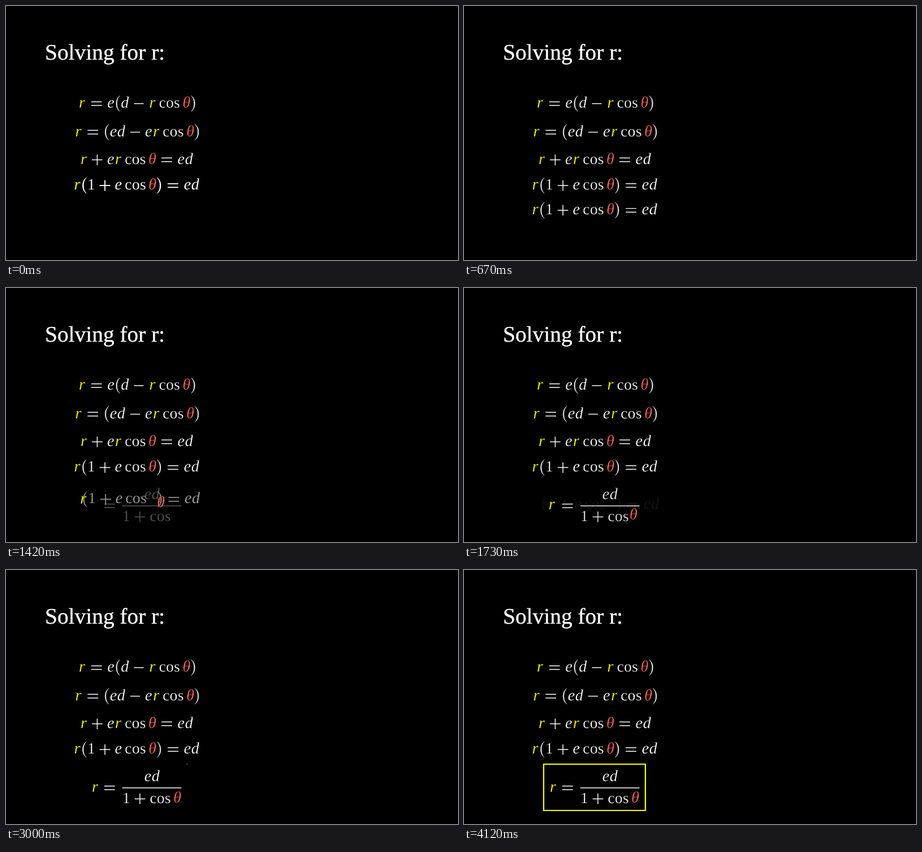
Recreate the animation shown at these times as an HTML page. Size 800 px wide and 450 px high, loop 5 s.

```html
<!DOCTYPE html>
<html lang="en">
<head>
<meta charset="utf-8">
<title>Solving for r</title>
<style>
  html, body { margin: 0; width: 100%; height: 100%; overflow: hidden; background: #000; }
  svg { display: block; width: 100vw; height: 100vh; }
  text { font-family: "Liberation Serif", "Times New Roman", serif; text-rendering: geometricPrecision; }
</style>
</head>
<body>
<svg id="stage" viewBox="0 0 800 450">
  <rect width="800" height="450" fill="#000"/>
  <text x="69" y="95.4" font-size="39.4" fill="#fff" stroke="#fff" stroke-width=".4">Solving for r:</text>
</svg>
<script>
const stage = document.getElementById("stage");
const LOOP = 5000;
const EM = 28.2;
const YELLOW = "#ffff00", RED = "#fc6255", WHITE = "#fff";

// Advance widths in em; " ", ":" and "," are thick, medium and thin spaces.
const ADVANCE = {
  r: .479, e: .466, d: .52, "θ": .469, c: .444, o: .5, s: .394, 1: .5,
  "(": .389, ")": .389, "=": .778, "+": .778, "-": .778,
  " ": .278, ":": .222, ",": .167
};
// Operators and brackets, in thousandths of an em.
const SHAPES = {
  "=": "M56-367H722M56-133H722",
  "+": "M56-250H722M389-583V83",
  "-": "M84-250H694",
  "(": "M326-750Q94-570 94-250T326 250L333 241Q154 70 154-250T333-741Z",
  ")": "M63-750Q295-570 295-250T63 250L56 241Q235 70 235-250T56-741Z"
};

function add(parent, tag, attrs) {
  const el = document.createElementNS("http://www.w3.org/2000/svg", tag);
  for (const key in attrs) el.setAttribute(key, attrs[key]);
  parent.appendChild(el);
  return el;
}

function glyph(parent, ch, x, y) {
  const path = SHAPES[ch];
  if (path) {
    const bracket = ch === "(" || ch === ")";
    return add(parent, "path", {
      d: path,
      transform: `translate(${x} ${y}) scale(${EM / 1000})`,
      fill: bracket ? WHITE : "none",
      stroke: WHITE,
      "stroke-width": bracket ? 10 : 52
    });
  }
  const italic = "redθ".includes(ch);
  // A hairline in the background colour lightens the strokes.
  const el = add(parent, "text", {
    x: x + ADVANCE[ch] * EM / 2,
    y,
    "text-anchor": "middle",
    "font-size": italic ? 28.4 : 27.4,
    "font-style": italic ? "italic" : "normal",
    fill: ch === "r" ? YELLOW : ch === "θ" ? RED : WHITE,
    stroke: "#000",
    "stroke-width": .25
  });
  el.textContent = ch;
  return el;
}

// Sets a formula and returns the x of each character; those in skip leave a gap.
function typeset(parent, formula, x, y, skip = "") {
  const at = {};
  for (const ch of formula) {
    at[ch] = x;
    if (!" :,".includes(ch) && !skip.includes(ch)) glyph(parent, ch, x, y);
    x += ADVANCE[ch] * EM;
  }
  return at;
}

const FACTORED = "r(1:+:e,cos,θ) = ed";
const ROW_X = 119.3, ROW_Y = 325.1, DROP = 50.5;
const SOLVED_X = 150.9, SOLVED_Y = 393.1, LOWER_Y = 412.5;

typeset(stage, "r = e(d:-:r,cos,θ)", 127.9, 180);
typeset(stage, "r = (ed:-:er,cos,θ)", 121.4, 230.6);
typeset(stage, "r:+:er,cos,θ = ed", 130.7, 279.6);
typeset(stage, FACTORED, ROW_X, ROW_Y);

const lowY = ROW_Y + DROP;
const oldPart = add(stage, "g", {});
const from = typeset(oldPart, FACTORED, ROW_X, lowY, "rθ");

const newPart = add(stage, "g", {});
typeset(newPart, "r =", SOLVED_X, SOLVED_Y, "r");
typeset(newPart, "ed", 244.4, 374.4);
const to = typeset(newPart, "1:+:cos,θ", 205.7, LOWER_Y, "θ");
add(newPart, "path", { d: "M205.7 386H310.6", stroke: WHITE, "stroke-width": 1.3 });

const radius = glyph(stage, "r", from.r, lowY);
const angle = glyph(stage, "θ", from["θ"], lowY);

const corners = [[321, 344], [141, 344], [141, 426], [321, 426], [321, 344]];
const frame = add(stage, "path", { fill: "none", stroke: YELLOW, "stroke-width": 2.2 });

const clamp = v => Math.min(1, Math.max(0, v));
const sigmoid = v => 1 / (1 + Math.exp(-v));
function smooth(t) {
  const edge = sigmoid(-5);
  return clamp((sigmoid(10 * (clamp(t) - .5)) - edge) / (1 - 2 * edge));
}

function move(el, x, y) {
  el.setAttribute("transform", `translate(${x} ${y})`);
}

// Every side takes an equal share of the drawing time.
function outline(share) {
  if (share <= 0) return "";
  if (share >= 1) return "M" + corners.slice(0, 4).join("L") + "Z";
  const side = Math.floor(share * 4), part = share * 4 - side;
  const [x, y] = corners[side], [nx, ny] = corners[side + 1];
  const tip = [x + (nx - x) * part, y + (ny - y) * part];
  return "M" + [...corners.slice(0, side + 1), tip].join("L");
}

function draw(ms) {
  const t = ms > 0 ? ms / 1000 + .014 : 0;
  const drop = smooth(t);
  const swap = smooth(t - 1);
  const lift = (drop - 1) * DROP;

  move(oldPart, 3.5 * swap, lift + 17 * swap);
  oldPart.setAttribute("opacity", 1 - swap);
  newPart.setAttribute("opacity", swap);
  move(radius, (SOLVED_X - from.r) * swap, lift + (SOLVED_Y - lowY) * swap);
  move(angle, (to["θ"] - from["θ"]) * swap, lift + (LOWER_Y - lowY) * swap);
  frame.setAttribute("d", outline(ms > 3000 ? smooth(t - 3) : 0));
}

const start = performance.now();
function tick() {
  draw((performance.now() - start) % LOOP);
  requestAnimationFrame(tick);
}
draw(0);
requestAnimationFrame(tick);
</script>
</body>
</html>
```
